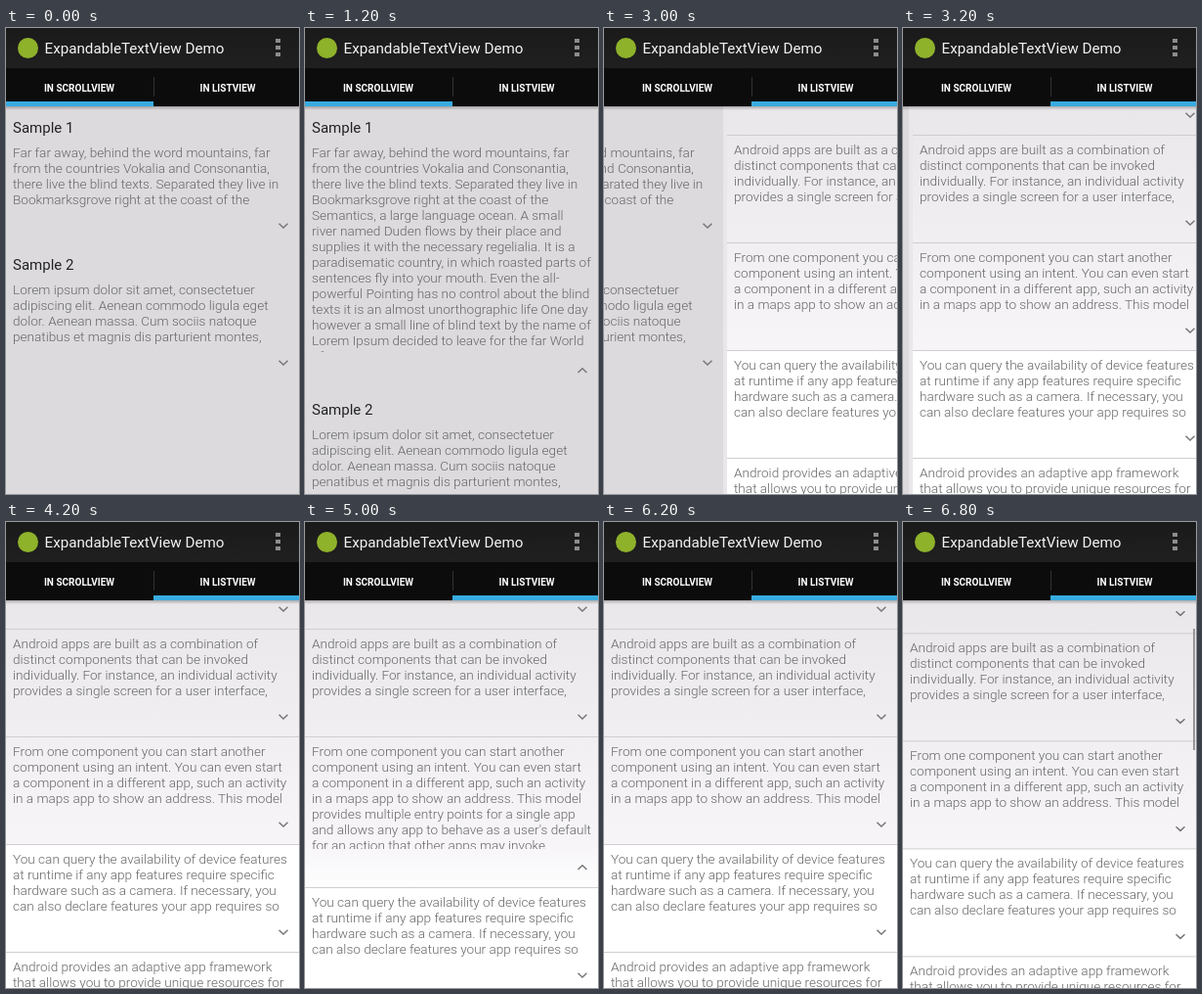
Animation of 300 by 476 pixels, one loop 7 s. Source, as an HTML page:

```html
<!DOCTYPE html>
<html lang="en">
<head>
<meta charset="utf-8">
<title>ExpandableTextView Demo</title>
<style>
  html, body { margin: 0; width: 100%; height: 100%; overflow: hidden; background: #e9e7ea; }
  body { position: relative; font-family: Roboto, sans-serif; }
  body div { position: absolute; box-sizing: border-box; white-space: nowrap; }

  .bar { left: 0; top: 0; width: 300px; height: 41px; background: linear-gradient(#1a1a1a, #202020); }
  .logo { left: 12px; top: 10px; width: 21px; height: 21px; border-radius: 50%; background: #8fb22b; }
  .name { left: 39.5px; top: 11px; font-size: 15.2px; line-height: 20px; color: #f3f3f3; }
  .dot { left: 276px; width: 5px; height: 4px; background: #8c8c8c; }

  .tabs { left: 0; top: 41px; width: 300px; height: 39px; background: #0c0c0c; }
  .tab { top: 11px; width: 150px; font: bold 10px/20px Roboto, sans-serif; text-align: center; color: #fff; }
  .split { left: 151px; top: 9px; width: 1px; height: 20px; background: #333; }
  .mark { top: 34px; width: 151px; height: 5px; background: #38abe0; }
  .shade { left: 0; top: 80px; width: 300px; height: 4px; background: linear-gradient(#0004, #0000); }

  .page { left: 0; top: 80px; width: 300px; height: 396px; overflow: hidden; }
  #scroll { padding-top: 1px; background: #dcdadd; }
  #list { background: linear-gradient(#e9e7ea, #f7f5f8 250px, #fff 300px); }
  #items { left: 0; top: -81px; width: 300px; }
  .page .item { position: relative; width: 300px; }
  #list .item { border-top: 1px solid #cfcdd0; }
  #list .white { background: #fff; }
  .title { left: 7px; top: 11px; font-size: 15px; line-height: 20px; color: #222; }
  .text { left: 7px; width: 293px; overflow: hidden; font-size: 13.6px; line-height: 16px;
          font-weight: 300; color: #666; }
  .page .text { white-space: pre; }
  .item svg { position: absolute; left: 279px; fill: none; stroke: #777; stroke-width: 1.5; }
  #thumb { left: 297px; top: 29px; width: 2px; height: 124px; background: #989699; }
</style>
</head>
<body>
<div class="page" id="scroll"></div>
<div class="page" id="list"><div id="items"></div><div id="thumb"></div></div>

<div class="bar">
  <div class="logo"></div>
  <div class="name">ExpandableTextView Demo</div>
  <div class="dot" style="top:11px"></div>
  <div class="dot" style="top:18px"></div>
  <div class="dot" style="top:25px"></div>
</div>
<div class="tabs">
  <div class="tab" style="left:0">IN SCROLLVIEW</div>
  <div class="tab" style="left:152px">IN LISTVIEW</div>
  <div class="split"></div>
  <div class="mark" id="mark"></div>
</div>
<div class="shade"></div>

<script>
const LOOP = 7000, STEP = 200, LINE = 16, ROWS = 4, PAGE_PITCH = 304;
const $ = id => document.getElementById(id);

const samples = [
`Far far away, behind the word mountains, far
from the countries Vokalia and Consonantia,
there live the blind texts. Separated they live in
Bookmarksgrove right at the coast of the
Semantics, a large language ocean. A small
river named Duden flows by their place and
supplies it with the necessary regelialia. It is a
paradisematic country, in which roasted parts of
sentences fly into your mouth. Even the all-
powerful Pointing has no control about the blind
texts it is an almost unorthographic life One day
however a small line of blind text by the name of
Lorem Ipsum decided to leave for the far World
of Grammar.`,
`Lorem ipsum dolor sit amet, consectetuer
adipiscing elit. Aenean commodo ligula eget
dolor. Aenean massa. Cum sociis natoque
penatibus et magnis dis parturient montes,`];

const entries = ['',
`Android apps are built as a combination of
distinct components that can be invoked
individually. For instance, an individual activity
provides a single screen for a user interface,`,
`From one component you can start another
component using an intent. You can even start
a component in a different app, such an activity
in a maps app to show an address. This model
provides multiple entry points for a single app
and allows any app to behave as a user's default
for an action that other apps may invoke.`,
`You can query the availability of device features
at runtime if any app features require specific
hardware such as a camera. If necessary, you
can also declare features your app requires so`,
`Android provides an adaptive app framework
that allows you to provide unique resources for`];

function addItem(parent, text, { height, top, chevron, title }) {
  const item = document.createElement('div');
  item.className = 'item';
  item.innerHTML = (title ? `<div class="title">${title}</div>` : '') +
    `<div class="text" style="top:${top}px">${text}</div>
     <svg width="10" height="6" style="bottom:${chevron}px"><path/></svg>`;
  parent.append(item);
  const box = item.querySelector('.text'), arrow = item.querySelector('path');
  const extra = Math.max(0, text.split('\n').length - ROWS) * LINE;
  const show = (amount, open) => {
    const grown = Math.round(extra * amount);
    item.style.height = height + grown + 'px';
    box.style.height = ROWS * LINE + grown + 'px';
    arrow.setAttribute('d', open ? 'M.5 5L5 .8L9.5 5' : 'M.5 .8L5 5L9.5 .8');
  };
  show(0, false);
  return { item, show };
}

const sampleItems = samples.map((text, i) =>
  addItem($('scroll'), text, { height: 140, top: 38, chevron: 16, title: `Sample ${i + 1}` }));
const listItems = entries.map((text, i) => {
  const entry = addItem($('items'), text, { height: 110, top: 6, chevron: 17 });
  entry.item.classList.toggle('white', i > 2);
  return entry;
});

const clamp = x => Math.min(1, Math.max(0, x));
const unfold = ms => (1 - Math.cos(Math.PI * clamp(ms / 243))) / 2;
const settle = ms => 1 - (1 - clamp(ms / 600)) ** 5;

function toggle(entry, t, opens, closes) {
  entry.show(unfold(t - opens) - unfold(t - closes), t >= opens && t < closes);
}

function render(t) {
  toggle(sampleItems[0], t, 1000, 2000);
  toggle(listItems[2], t, 4800, 5800);

  const shift = PAGE_PITCH * settle(t - 2903);
  $('scroll').style.transform = `translateX(${-Math.round(shift)}px)`;
  $('list').style.transform = `translateX(${PAGE_PITCH - Math.round(shift)}px)`;
  $('mark').style.left = t >= 2903 ? '151px' : '0';

  const dragging = t >= 6800;
  $('items').style.transform = `translateY(${dragging ? 4.4 : 0}px)`;
  $('thumb').style.visibility = dragging ? 'visible' : 'hidden';
}

const start = performance.now();
function tick() {
  const t = (performance.now() - start) % LOOP;
  render(Math.floor(t / STEP) * STEP);
  requestAnimationFrame(tick);
}
tick();
</script>
</body>
</html>
```
